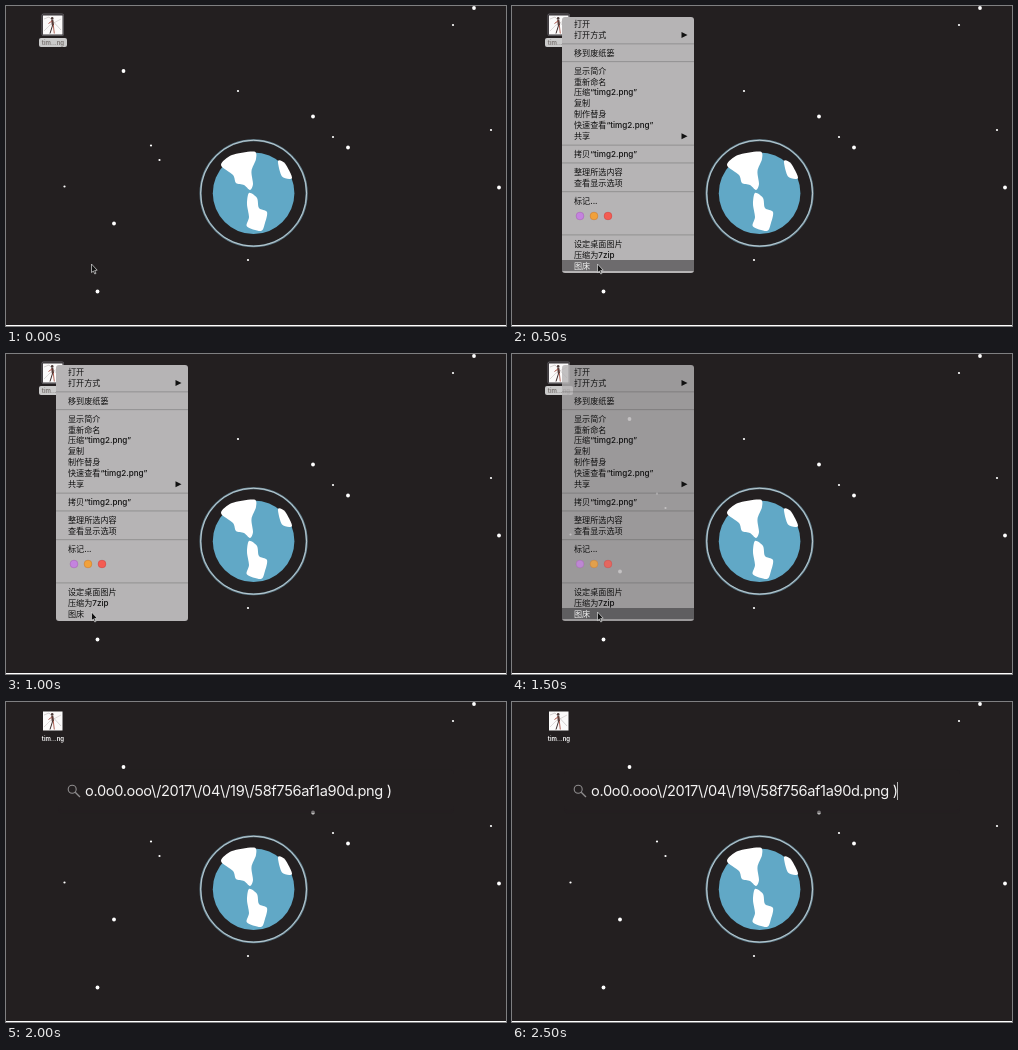
Recreate the animation shown at these times as an HTML page with a canvas. Size 500 by 320 pixels, loop 3000 ms.

```html
<!DOCTYPE html>
<html lang="zh">
<head>
<meta charset="utf-8">
<title>Desktop menu</title>
<style>
  html, body { margin: 0; width: 100%; height: 100%; overflow: hidden; background: #231f20; }
  canvas { display: block; width: 500px; height: 320px; }
</style>
</head>
<body>
<canvas id="stage" width="500" height="320"></canvas>
<script>
const ctx = document.getElementById('stage').getContext('2d');
const BG = '#231f20', INK = '#111';
const SANS = 'Inter, "Noto Sans CJK SC", "Noto Sans CJK", sans-serif';
const STEP = 500, STEPS = 6;

const menu = { x: 50, y: 11, w: 132, h: 256, row: 10.95, gap: 17.8, tagGap: 25.4 };
const menuGroups = [
  ['打开', '打开方式 >'],
  ['移到废纸篓'],
  ['显示简介', '重新命名', '压缩“timg2.png”', '复制', '制作替身', '快速查看“timg2.png”', '共享 >'],
  ['拷贝“timg2.png”'],
  ['整理所选内容', '查看显示选项'],
  ['标记...'],
  ['设定桌面图片', '压缩为7zip', '图床']
];
const tagColors = ['#c483df', '#f1a13a', '#f45c52'];

const bigStars = [[468, 2], [117.5, 65], [307, 110.5], [342, 141.5], [493, 181.5], [108, 217.5], [91.5, 285.5]];
const smallStars = [[447, 19], [232, 85], [485, 124], [327, 131], [145, 139.5], [153.5, 154], [58.5, 180.5], [242, 254]];

function disc(x, y, r, color) {
  ctx.fillStyle = color;
  ctx.beginPath();
  ctx.arc(x, y, r, 0, Math.PI * 2);
  ctx.fill();
}

function ring(x, y, r, color, width) {
  ctx.strokeStyle = color;
  ctx.lineWidth = width;
  ctx.beginPath();
  ctx.arc(x, y, r, 0, Math.PI * 2);
  ctx.stroke();
}

function box(x, y, w, h, r, color) {
  ctx.fillStyle = color;
  ctx.beginPath();
  ctx.roundRect(x, y, w, h, r);
  ctx.fill();
}

function line(color, width, ...points) {
  ctx.strokeStyle = color;
  ctx.lineWidth = width;
  ctx.beginPath();
  points.forEach(([x, y]) => ctx.lineTo(x, y));
  ctx.stroke();
}

function polygon(color, ...points) {
  ctx.fillStyle = color;
  ctx.beginPath();
  points.forEach(([x, y]) => ctx.lineTo(x, y));
  ctx.closePath();
  ctx.fill();
}

// Closed outline curving through its key points (Catmull-Rom).
function blob(color, ...points) {
  const n = points.length;
  const at = i => points[(i + n) % n];
  const handle = (i, dir) => at(i).map((v, k) => v + dir * (at(i + 1)[k] - at(i - 1)[k]) / 7);
  ctx.fillStyle = color;
  ctx.beginPath();
  ctx.moveTo(...at(0));
  for (let i = 0; i < n; i++) {
    ctx.bezierCurveTo(...handle(i, 1), ...handle(i + 1, -1), ...at(i + 1));
  }
  ctx.fill();
}

function label(text, x, y, font, color, align = 'left') {
  ctx.font = `${font} ${SANS}`;
  ctx.fillStyle = color;
  ctx.textAlign = align;
  ctx.fillText(text, x, y);
}

function drawSky() {
  box(0, 0, 500, 320, 0, BG);
  bigStars.forEach(([x, y]) => disc(x, y, 1.9, '#fff'));
  smallStars.forEach(([x, y]) => disc(x, y, 1.1, '#fff'));
  box(0, 319, 500, 1, 0, '#fff');
}

function drawEarth() {
  const x = 247.6, y = 187.2;
  ring(x, y, 53, '#648493', 2.1);
  ring(x, y, 53, '#d3dce0', 0.8);
  disc(x, y, 40.8, '#61a8c6');
  blob('#fff', [215, 159], [226, 149], [248, 145.5], [250, 153], [245.5, 165], [247, 178],
    [244, 184], [238, 179], [230, 177], [227, 169]);
  blob('#fff', [272, 155], [279, 157.5], [286, 172], [276, 170.5]);
  blob('#fff', [243, 187], [251, 192], [253, 202], [261, 206], [259, 217], [255, 225],
    [241, 220.5], [243, 211], [241, 198]);
}

function drawFile(selected) {
  if (selected) {
    box(35.5, 7.5, 22.5, 22.5, 2, '#69676b');
    box(36.3, 8.3, 21, 21, 1, '#343033');
    box(33, 32, 28, 9, 2, '#cacaca');
  }
  box(37, 9.5, 19.5, 19, 0, '#fbfafa');
  line('#b9b4b4', 0.6, [38, 13], [43, 11], [55, 24]);
  line('#c8c2c2', 0.6, [38, 25], [44, 19], [55, 13]);
  disc(46.2, 12.4, 1.3, '#4b3a38');
  line('#5a3c38', 2.2, [46.2, 14], [47, 19.5]);
  line('#a8544a', 1, [46, 15], [42.5, 17.5]);
  line('#3b2b2b', 1, [46.7, 19], [44, 27.5]);
  line('#b1665a', 1, [47.3, 19], [48.3, 27.5]);
  label('tim...ng', 47, 38.7, '600 6px', selected ? '#77716f' : '#fff', 'center');
}

function drawRow(text, y, active) {
  const [name, submenu] = text.split(' ');
  if (active) box(menu.x, y - 5.7, menu.w, 11, 0, active);
  label(name, 62, y + 3, '500 8.1px', active ? '#f4f4f4' : INK);
  if (submenu) polygon(INK, [169.5, y - 3], [175.5, y], [169.5, y + 3]);
}

function drawTags(y, opacity) {
  ctx.globalAlpha = opacity;
  tagColors.forEach((color, i) => {
    disc(68 + 14 * i, y, 4.1, color);
    ring(68 + 14 * i, y, 3.9, 'rgba(90,40,60,.28)', 0.6);
  });
  ctx.globalAlpha = 1;
}

function drawMenu(highlight, opacity) {
  ctx.globalAlpha = opacity;
  box(menu.x, menu.y, menu.w, menu.h, 3, '#b6b4b5');
  ctx.globalAlpha = 1;

  let y = menu.y + 7;
  menuGroups.forEach((group, g) => {
    const last = g === menuGroups.length - 1;
    group.forEach((text, i) => {
      drawRow(text, y + i * menu.row, last && i === group.length - 1 && highlight);
    });
    y += (group.length - 1) * menu.row;
    if (last) return;
    if (group[0].startsWith('标记')) {
      drawTags(y + 15.4, opacity);
      y += menu.tagGap;
    }
    const rule = y + menu.gap / 2;
    line('rgba(70,68,70,.32)', 1, [menu.x, rule], [menu.x + menu.w, rule]);
    y += menu.gap;
  });
}

function drawPointer() {
  const outline = [[85.5, 258], [85.5, 266.6], [87.4, 265], [88.8, 268], [90, 267.4], [88.7, 264.5], [91.2, 264.2]];
  polygon(INK, ...outline);
  line('#ddd', 0.7, ...outline, outline[0]);
}

function drawSearch(caret) {
  ctx.globalAlpha = 0.6;
  box(52, 67.5, 396, 44, 4, BG);
  ctx.globalAlpha = 1;
  box(52, 68, 396, 40, 4, BG);
  ring(66.2, 87.3, 4, '#8f8d8e', 1.1);
  line('#8f8d8e', 1.3, [69.2, 90.3], [74, 95]);
  ctx.letterSpacing = '-0.35px';
  label('o.0o0.ooo\\/2017\\/04\\/19\\/58f756af1a90d.png )', 79, 94.4, '400 14.6px', '#f3f2f2');
  ctx.letterSpacing = '0px';
  if (caret) box(385, 80, 1, 18, 0, '#b5b4b4');
}

function draw(time) {
  const step = Math.floor(time / STEP) % STEPS;
  const searching = step >= 4, fading = step === 3;
  drawSky();
  if (searching) drawSearch(step === 5);
  drawEarth();
  drawFile(!searching);
  if (searching) return;
  // The chosen row blinks once before the menu fades.
  const highlight = step === 2 ? null : fading ? '#5f5e60' : '#6d6b6d';
  if (step >= 1) drawMenu(highlight, fading ? 0.82 : 1);
  drawPointer();
}

const start = performance.now();
function tick() {
  draw(performance.now() - start);
  requestAnimationFrame(tick);
}
tick();
</script>
</body>
</html>
```
